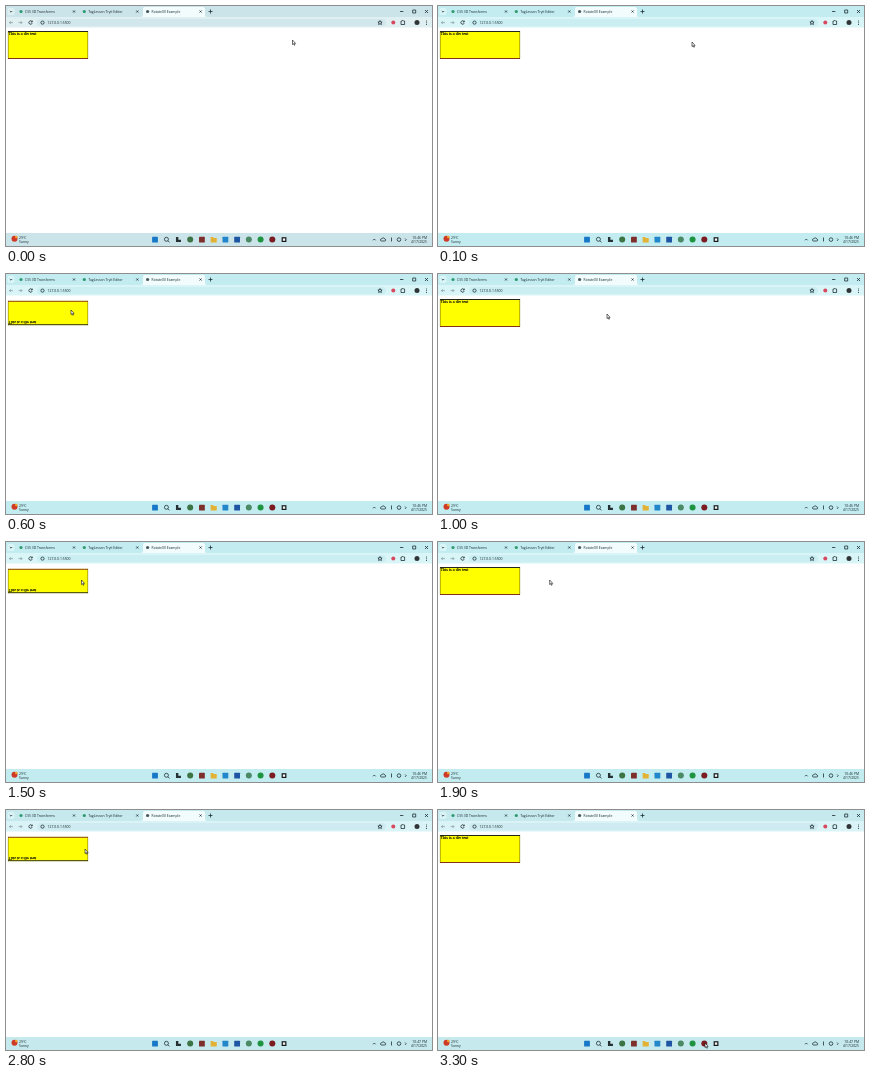
These frames come from a looping animation (426 by 240 pixels, 3.4 s). An HTML page:

```html
<!DOCTYPE html>
<html lang="en">
<head>
<meta charset="utf-8">
<title>Rotate on hover</title>
<style>
  html, body { margin: 0; width: 100%; height: 100%; overflow: hidden; background: #fff; }
  svg { display: block; width: 100vw; height: 100vh; }
  text { font: 500 3.4px "Open Sans", "Noto Sans", sans-serif; fill: #14262b; }
  .serif { font: 4.2px "Liberation Serif", "Noto Serif", serif; fill: #000; stroke: #000; stroke-width: .12; }
  .end { text-anchor: end; }
  .bar { fill: var(--bar); }
  .tool { fill: var(--tool); }
  .line { fill: none; stroke: #1d3036; stroke-width: .8; }
  .faint { opacity: .4; }
</style>
</head>
<body>
<svg id="stage" viewBox="0 0 426 240" preserveAspectRatio="none">
  <rect width="426" height="240" fill="#fff"/>

  <rect class="bar" width="426" height="12"/>
  <rect class="tool" y="11" width="426" height="10.5"/>
  <path d="M135 11q2 0 2-2V3q0-2 2-2h58q2 0 2 2v6q0 2 2 2z" fill="#f2fcfd"/>
  <rect class="tool" x="1.5" y="2" width="7" height="7" rx="2"/>
  <path class="line" d="M3.8 5l1.2 1.2L6.2 5M202.5 5.5h4M204.5 3.5v4M394 5.5h3.4M406.7 4h3v3h-3zM419 4l3 3m0-3l-3 3"/>
  <g id="tabs"></g>

  <g id="toolbar">
    <rect class="bar" x="31" y="13" width="349" height="7.3" rx="3.6" opacity=".65"/>
    <path class="line faint" d="M7 16.6H3.5L5 15.1M3.5 16.6L5 18.1M12.5 16.6H16l-1.5-1.5M16 16.6l-1.5 1.5"/>
    <path class="line" d="M26 15.6a1.7 1.7 0 1 0 .2 1.5M26.3 14.6v1.4h-1.4"/>
    <circle class="line" cx="36.5" cy="16.6" r="1.6"/>
    <text x="41.5" y="18">127.0.0.1:5500</text>
    <path class="line" d="M374 14.5l.6 1.4 1.5.1-1.1 1 .4 1.5-1.4-.8-1.4.8.4-1.5-1.1-1 1.5-.1z"/>
    <circle cx="387.3" cy="16.6" r="2" fill="#d6495f"/>
    <path class="line" d="M395 15h1.2q.6-1.4 1.2 0h1.2v3.5H395z"/>
    <circle cx="411" cy="16.6" r="2.5" fill="#303638"/>
    <path class="line" d="M420.5 14.5v4.5" stroke-dasharray="1 .75"/>
  </g>

  <g id="card">
    <rect x="2" y="25" width="80" height="28" fill="#ff0"/>
    <path d="M2.3 25v28M81.7 25v28" stroke="#77700c" stroke-width=".6"/>
    <path d="M2 25.5h80" stroke="#25251a"/>
    <path d="M2 52.5h80" stroke="#85321a"/>
    <text class="serif" x="2.4" y="29.2">This is a div text</text>
  </g>

  <g id="taskbar">
    <rect class="bar" y="227" width="426" height="13"/>
    <circle cx="8.5" cy="232.8" r="3" fill="#cf3a28"/>
    <circle cx="10.3" cy="231" r="1.3" fill="#f0a22e"/>
    <text x="13" y="232.6">29°C</text>
    <text x="13" y="236.8">Sunny</text>
    <g id="apps"></g>
    <path class="line" d="M367 234.3l1.3-1.3 1.3 1.3M375.5 235h3.2a1 1 0 0 0 0-2 1.6 1.6 0 0 0-3-.2 1.1 1.1 0 0 0-.2 2.2M385.5 231.5v4M399 232.5l1.2 1.2-1.2 1.2"/>
    <circle class="line" cx="393" cy="233.6" r="1.8"/>
    <text id="clock" class="end" x="421" y="232.6"></text>
    <text class="end" x="421" y="236.8">4/17/2025</text>
  </g>

  <path id="cursor" d="M0 0V4.6l1-.9.8 1.6.7-.3-.8-1.6h1.4z" fill="#fff" stroke="#111" stroke-width=".6"/>
</svg>
<script>
const LOOP = 3400;
const STEP = 100;
const TILT = Math.cos(150 * Math.PI / 180);
const byId = id => document.getElementById(id);

function add(parent, tag, attrs, text = "") {
  const node = document.createElementNS("http://www.w3.org/2000/svg", tag);
  for (const key in attrs) node.setAttribute(key, attrs[key]);
  node.textContent = text;
  parent.append(node);
}

["CSS 3D Transforms", "TagLesson Tryit Editor", "RotateX() Example"].forEach((title, i) => {
  const x = 15 + i * 63.3;
  const fill = i < 2 ? "#2c9a70" : "#46575c";
  add(byId("tabs"), "circle", { cx: x, cy: 5.5, r: 1.6, fill });
  add(byId("tabs"), "text", { x: x + 4, y: 6.8 }, title);
  add(byId("tabs"), "path", { class: "line", d: `M${x + 52} 4.5l2 2m0-2l-2 2` });
});

// Icons are drawn around their own centre.
const disc = fill => ["circle", { r: 3, fill }];
const square = fill => ["rect", { x: -2.9, y: -2.9, width: 5.8, height: 5.8, rx: .6, fill }];
const shape = (d, fill) => ["path", { d, fill }];
const icons = [
  square("#1778c8"),
  ["path", { class: "line", d: "M1.2 1.2l1.6 1.6M1.7-.3a2 2 0 1 1-4 0 2 2 0 1 1 4 0" }],
  shape("M-2.5-2.5h2.4v2.6h2.6v2.4h-5z", "#263136"),
  disc("#3c7446"),
  square("#7c2f2b"),
  shape("M-3-2.6h2.3l.8 1h3v4.4h-6.1z", "#e3b235"),
  square("#2386cb"),
  square("#1f56a3"),
  disc("#4b8a65"),
  disc("#1f9440"),
  disc("#7a1c22"),
  ["rect", { x: -1.8, y: -1.8, width: 3.6, height: 3.6, fill: "#eef6f6", stroke: "#18181b", "stroke-width": 1.2 }]
];
icons.forEach(([tag, attrs], i) => {
  const transform = `translate(${149 + i * 11.73} 233.6)`;
  add(byId("apps"), tag, { ...attrs, transform });
});

// Each move carries the pointer to (x, y); it rests between moves.
const moves = [
  { from: 0, until: 100, x: 254, y: 36 },
  { from: 100, until: 600, x: 65, y: 36 },
  { from: 800, until: 1000, x: 169, y: 40 },
  { from: 1200, until: 1500, x: 75.5, y: 38 },
  { from: 1800, until: 2100, x: 184, y: 38 },
  { from: 2100, until: 2400, x: 92.5, y: 35 },
  { from: 2400, until: 2600, x: 79, y: 39 },
  { from: 2800, until: 3000, x: 246, y: 68 },
  { from: 3000, until: 3300, x: 267, y: 233 }
];

function pointerAt(time) {
  let x = 286.5, y = 34;
  for (const move of moves) {
    const k = Math.min(1, Math.max(0, (time - move.from) / (move.until - move.from)));
    x += (move.x - x) * k;
    y += (move.y - y) * k;
  }
  return [x, y];
}

function tint(time) {
  if (time < 100) return ["#cbe4e9", "#dfeff2"];
  if (time < 2500) return ["#c3ecf0", "#d9f5f7"];
  return ["#c6e9ee", "#daf3f6"];
}

function render(now) {
  const time = Math.floor((now % LOOP) / STEP) * STEP;
  const [x, y] = pointerAt(time);
  const hovered = x < 82 && y > 25 && y < 53;
  const [bar, tool] = tint(time);
  byId("stage").style.setProperty("--bar", bar);
  byId("stage").style.setProperty("--tool", tool);
  byId("card").setAttribute("transform", `translate(0 39) scale(1 ${hovered ? TILT : 1}) translate(0 -39)`);
  byId("cursor").setAttribute("transform", `translate(${x} ${y})`);
  byId("clock").textContent = time < 2100 ? "10:46 PM" : "10:47 PM";
}

let start;
function tick(now) {
  start ??= now;
  render(now - start);
  requestAnimationFrame(tick);
}
render(0);
requestAnimationFrame(tick);
</script>
</body>
</html>
```
